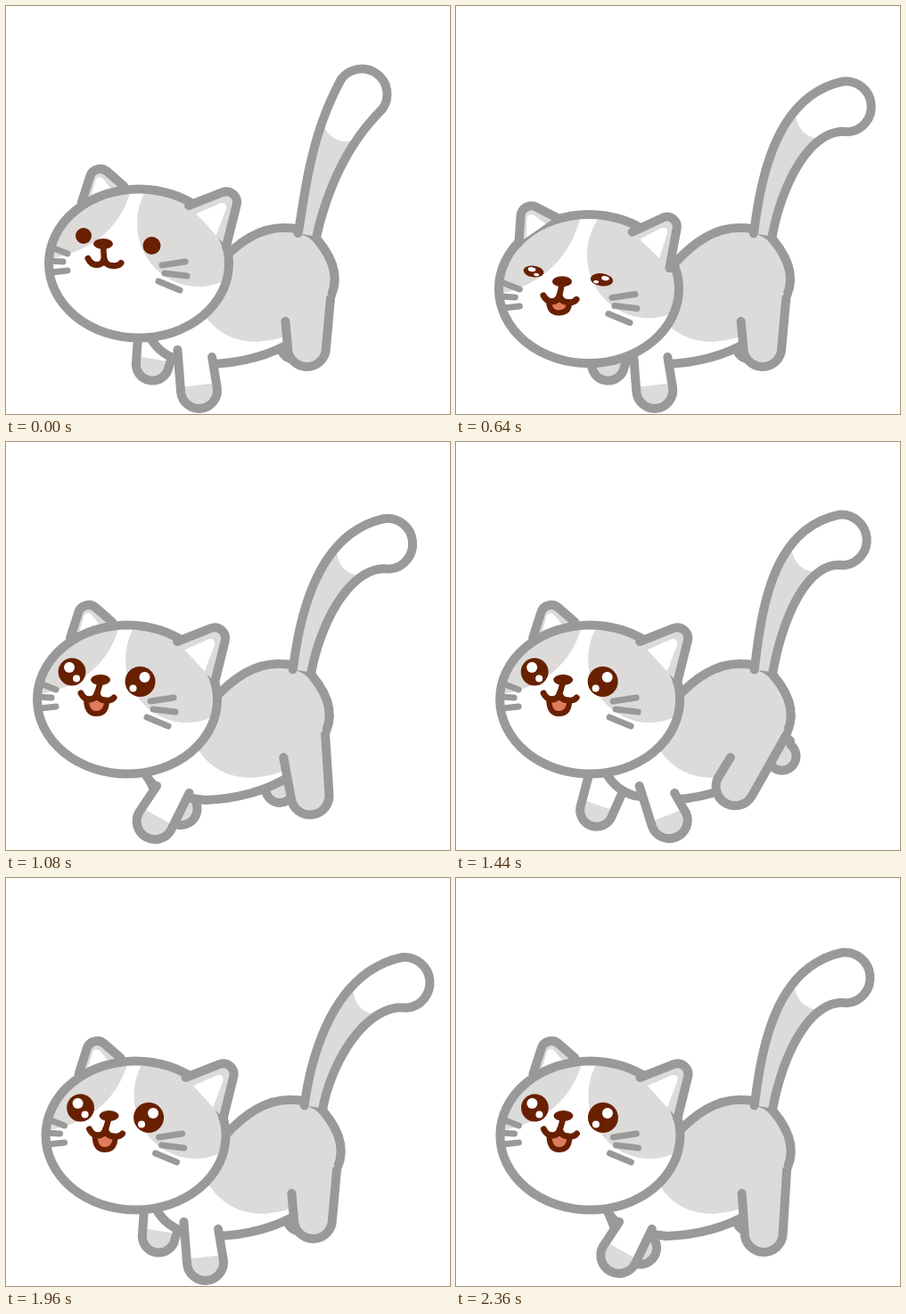
An HTML page with a canvas for the animation above (2.4 s loop, 498 by 458 pixels).

```html
<!DOCTYPE html>
<html>
<head>
<meta charset="utf-8">
<title>Walking cat</title>
<style>
html, body { margin: 0; overflow: hidden; background: #fff; }
canvas { display: block; }
</style>
</head>
<body>
<canvas id="stage" width="498" height="458"></canvas>
<script>
const ctx = document.getElementById('stage').getContext('2d');
const LINE = '#999', GREY = '#dcdbda', WHITE = '#fff', BROWN = '#682000', TONGUE = '#e07a5c';
const LOOP = 2400, STRIDE = 660, WALK_START = 640, TURN = Math.PI * 2;

const mix = (a, b, k) => a + (b - a) * k;
const mixAll = (a, b, k) => a.map((v, i) => mix(v, b[i], k));
const ease = (from, to, t) => {
  const k = Math.min(1, Math.max(0, (t - from) / (to - from)));
  return k * k * (3 - 2 * k);
};

// Foot path: centre x/y, swing forward (dx, dy) and ground arc; lag is a part of a stride.
// follow: how far the left and right hip points go along with the foot.
const LEGS = {
  farHind: { left: [318, 350], right: [362, 335], follow: [.5, .5], r: 16,
    foot: [340, 373], swing: [30, 24], arc: 0, lag: .625 },
  farFront: { left: [160, 375], right: [200, 389], follow: [.45, .45], r: 18.5, sock: true,
    foot: [183, 411], swing: [26, 0], arc: 10, lag: .5 },
  nearHind: { left: [317, 354], right: [371, 328], follow: [.4, 0], r: 21.5,
    foot: [336, 391], swing: [27, 0], arc: 8, lag: .625 },
  nearFront: { left: [194, 386], right: [232, 394], follow: [.4, .45], r: 20.5, sock: true,
    foot: [210, 426], swing: [30, 0], arc: 6, lag: 0 }
};
LEGS.farHind.lag = .125;

// Tail poses: bend x, tip x, tip y, tip direction.
const TAIL_UP = [355, 406, 99, -.94], TAIL_LEAN = [383, 430, 96, -1.3];

function paint(path, fill, stroke, width = 10) {
  if (fill) { ctx.fillStyle = fill; ctx.fill(path); }
  if (stroke) { ctx.strokeStyle = stroke; ctx.lineWidth = width; ctx.stroke(path); }
}
function placed(x, y, draw) {
  ctx.save();
  ctx.translate(x, y);
  draw();
  ctx.restore();
}
function clipped(path, draw) {
  ctx.save();
  ctx.clip(path);
  draw();
  ctx.restore();
}
function oval(x, y, rx, ry, fill) {
  const p = new Path2D();
  p.ellipse(x, y, rx, ry, 0, 0, TURN);
  paint(p, fill);
}

function drawLeg({ left, right, follow, r, sock, foot, swing, arc, lag }, gait) {
  const angle = gait - lag * TURN;
  const dx = -swing[0] * Math.cos(angle);
  const x = foot[0] + dx, y = foot[1] + swing[1] * Math.cos(angle) + arc * Math.sin(angle);
  const lx = left[0] + follow[0] * dx, ly = left[1];
  const rx = right[0] + follow[1] * dx, ry = right[1];
  const a = Math.atan2(y - (ly + ry) / 2, x - (lx + rx) / 2);
  const line = new Path2D();
  line.moveTo(lx, ly);
  line.arc(x, y, r, a + Math.PI / 2, a - Math.PI / 2, true);
  line.lineTo(rx, ry);
  const shape = new Path2D(line);
  shape.lineTo(rx - 6, ry - 11);
  shape.lineTo(lx + 4, ly - 11);
  paint(shape, sock ? WHITE : GREY);
  if (sock) clipped(shape, () => {
    ctx.translate(x, y);
    ctx.rotate(a);
    ctx.fillStyle = GREY;
    ctx.fillRect(-6, -40, 60, 80);
  });
  paint(line, null, LINE);
}

function drawBody() {
  const body = new Path2D('M165 365Q176 390 200 397L236 402Q290 400 330 376L368 332'
    + 'Q388 300 356 262Q345 249 320 249Q282 248 245 290Z');
  paint(body, WHITE);
  clipped(body, () => paint(new Path2D('M228 345Q249 377 289 377Q317 375 336 363H400V230H228Z'), GREY));
  paint(body, null, LINE);
}

// A cubic spine that widens from the base to a round tip.
function drawTail([bend, tx, ty, direction]) {
  const xs = [345, bend, tx - 62 * Math.cos(direction), tx];
  const ys = [257, 205, ty - 62 * Math.sin(direction), ty];
  const point = (p, s) => (1 - s) ** 3 * p[0] + 3 * (1 - s) ** 2 * s * p[1]
    + 3 * (1 - s) * s * s * p[2] + s ** 3 * p[3];
  const slope = (p, s) => (1 - s) ** 2 * (p[1] - p[0]) + 2 * (1 - s) * s * (p[2] - p[1])
    + s * s * (p[3] - p[2]);
  const edge = (s, side) => {
    const a = Math.atan2(slope(ys, s), slope(xs, s)) + side * Math.PI / 2;
    const r = 10.5 + 18 * s ** 1.5;
    return [point(xs, s) + r * Math.cos(a), point(ys, s) + r * Math.sin(a)];
  };
  const outline = from => {
    const p = new Path2D(), n = 24;
    for (let i = 0; i <= n; i++) p.lineTo(...edge(mix(from, 1, i / n), -1));
    p.arc(tx, ty, 28.5, direction - Math.PI / 2, direction + Math.PI / 2);
    for (let i = n; i >= 0; i--) p.lineTo(...edge(mix(from, 1, i / n), 1));
    return p;
  };
  const whole = outline(0), end = outline(.73);
  paint(whole, GREY);
  end.quadraticCurveTo(point(xs, .62), point(ys, .62), ...edge(.73, -1));
  paint(end, WHITE);
  paint(whole, null, LINE);
}

function drawEar(ax, ay, tx, ty, cx, cy, turn, size) {
  const mx = (ax + cx) / 2, my = (ay + cy) / 2;
  const ear = new Path2D(), inner = new Path2D();
  const ex = mix(cx, ax, .27), ey = mix(cy, ay, .27);
  ear.moveTo(ax, ay);
  ear.arcTo(mix(tx, mx, -.16), mix(ty, my, -.16), cx, cy, 12);
  ear.lineTo(cx, cy);
  inner.moveTo(mix(ax, cx, .2), mix(ay, cy, .2));
  inner.arcTo(mix(tx, mx, .24), mix(ty, my, .24), ex, ey, 5);
  inner.lineTo(ex, ey);
  ctx.save();
  ctx.rotate(turn);
  ctx.scale(size, size);
  paint(ear, GREY);
  paint(inner, WHITE);
  paint(ear, null, LINE, 10 / size);
  ctx.restore();
}

function drawEye(side, t) {
  const open = ease(560, 760, t);
  if (t < 160) oval(0, 0, 9.5 + side / 2, 9.5 + side / 2, BROWN);
  else if (t < 560) paint(new Path2D('M-8 1C-5-6 6-6 8.500 2'), null, BROWN, 4.5);
  else {
    const r = 16.2 + side * .8;
    ctx.rotate(.2 * (1 - open));
    ctx.scale(mix(.6, 1, open), mix(.1, 1, open));
    oval(0, 0, r, r, BROWN);
    oval(1 + 4 * side, -5, 6, 6, WHITE);
    oval(-1.5 - 6.5 * side, 7.5, 4, 4, WHITE);
  }
}

function drawMouth(t, nod) {
  const open = ease(540, 680, t), shut = 1 - open;
  oval(0, 0, 11, 6, BROWN);
  paint(new Path2D(`M0 2L${mix(-4, 1, shut)} 16`), null, BROWN, 6.5);
  ctx.translate(-4 + 5 * shut, 15 + 1.5 * shut);
  ctx.rotate(-.13 * nod * shut);
  const low = mix(7, 23, open);
  if (open) paint(new Path2D(`M-12 6Q-12 ${low}-1 ${low}Q11 ${low} 11 8Q0 7 0 1Q-4 8-12 6Z`), TONGUE, BROWN, 6);
  paint(new Path2D('M-18 0Q-14 8-7 7Q-1 6 0 0Q2 8 9 8Q16 9 19 5'), null, BROWN, 7);
}

function drawHead(t, nod) {
  const drop = 46 * nod * nod, tilt = 1 - (1 - nod) ** 2;
  const head = new Path2D();
  head.ellipse(0, 0, 101, 83.5, 0, 0, TURN);
  const leftEar = () => drawEar(-64, -69, -48, -110, -17, -87, -.32 * tilt, 1);
  if (nod < .25) leftEar();
  paint(head, WHITE);
  clipped(head, () => {
    paint(new Path2D(`M-8-85Q-26 ${drop * .65 - 18}-102 ${drop - 5}H-120V-100Z`), GREY);
    oval(67, drop * .6 - 45, 69, 71, GREY);
    placed(drop / 5, drop, () => paint(new Path2D('M-98-18L-80-11M-102-3L-85-2M-98 10L-80 8'), null, LINE, 7));
  });
  paint(head, null, LINE);
  if (nod >= .25) leftEar();
  drawEar(56, -65, 110, -82, 98, -19, -.12 * nod, 1 - .13 * nod);
  placed(0, drop * .7, () => paint(new Path2D('M26 2L52-2M29 11L54 14M22 20L46 30'), null, LINE, 7));
  placed(-62, drop - 31, () => drawEye(-1, t));
  placed(14.5, drop * .85 - 20, () => drawEye(1, t));
  placed(-30 - 10 * (1 - ease(40, 280, t)), drop * 1.2 - 22, () => drawMouth(t, nod));
}

function draw(t) {
  const gait = (Math.max(t, WALK_START) - 1086) / STRIDE * TURN;
  const walk = ease(WALK_START, 800, t);
  const lunge = 13 * Math.exp(-(((t - 1070) / 130) ** 2));
  const nod = ease(40, 330, t) - ease(490, 790, t);
  const leg = name => drawLeg(LEGS[name], gait);

  ctx.fillStyle = WHITE;
  ctx.fillRect(0, 0, 498, 458);
  ctx.lineCap = ctx.lineJoin = 'round';

  placed(-lunge - 7 * (1 - ease(400, 700, t)), 0, () => {
    leg('farHind');
    leg('farFront');
    drawBody();
    const sway = 12 * Math.cos(gait - 1.3) * walk, whip = ease(360, 640, t);
    const lean = mixAll(TAIL_UP, TAIL_LEAN, ease(40, 360, t));
    const tail = mixAll(lean, [353, 438 + sway, 113 + sway / 2, -.1], whip);
    tail[1] += 30 * Math.sin(Math.PI * whip);
    drawTail(tail);
    leg('nearHind');
    leg('nearFront');
  });

  const headX = 149 - 4 * Math.cos(gait - 1.5) * walk - lunge;
  placed(headX, 289 + 57 * nod, () => drawHead(t, nod));
}

function play(now) {
  const t = Math.floor(now % LOOP / 40) * 40;
  draw(t < 80 ? 0 : t);
  requestAnimationFrame(play);
}
requestAnimationFrame(play);
</script>
</body>
</html>
```
